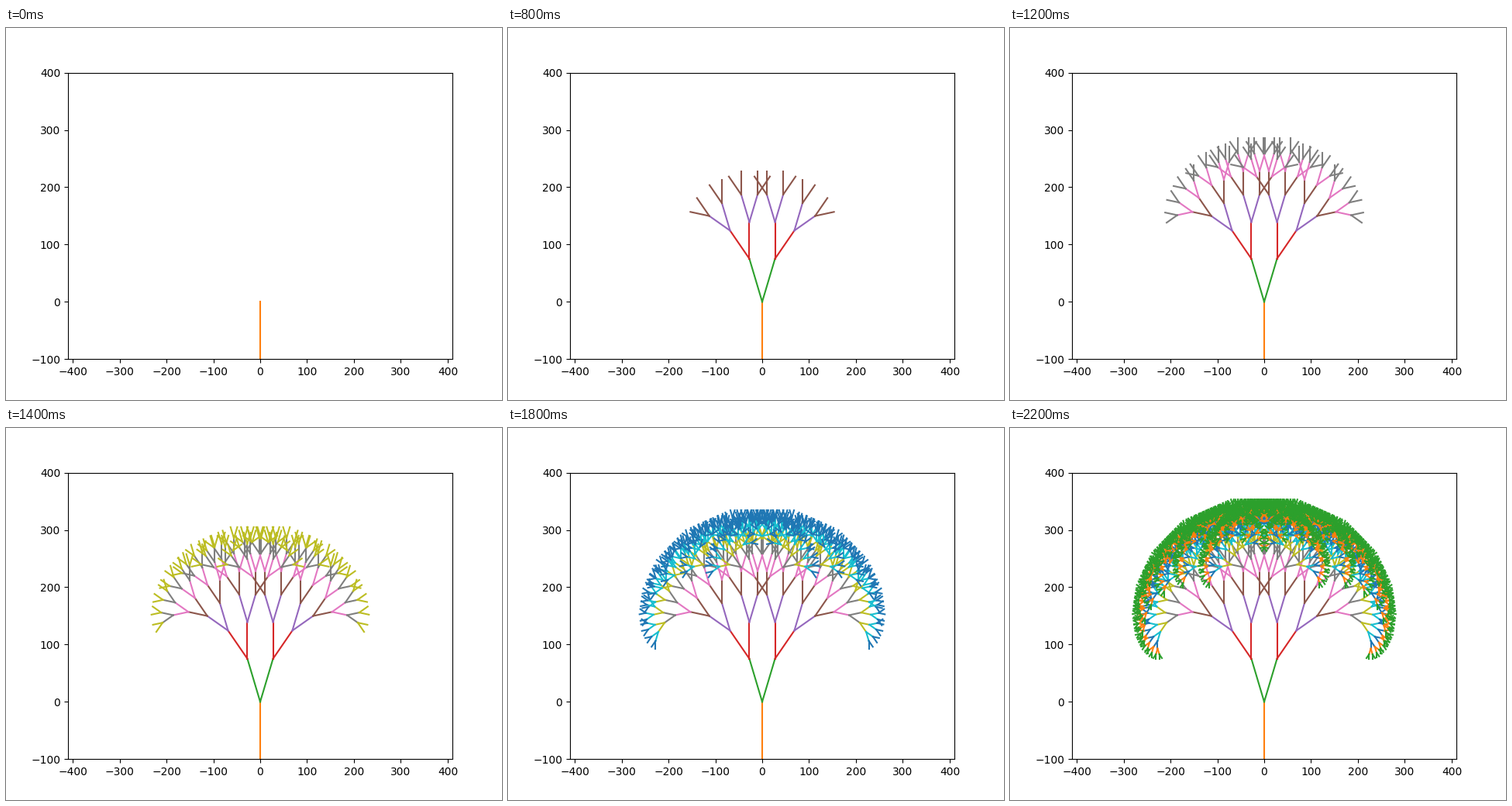
Animation of 640x480 px, one loop 2.4 s. Source, as a matplotlib script:

```python
import numpy as np
import matplotlib.pyplot as plt
from matplotlib.animation import FuncAnimation
from matplotlib.collections import LineCollection

LEVELS = 12
TRUNK = 100
RATIO = 0.8
TURN = np.radians(20)


def grow():
    """Yield the segments of each level as an array of (start, end) pairs."""
    base = np.array([[0.0, -TRUNK]])
    angle = np.array([np.pi / 2])
    length = TRUNK
    for _ in range(LEVELS):
        tip = base + length * np.column_stack([np.cos(angle), np.sin(angle)])
        yield np.stack([base, tip], axis=1)
        base = np.repeat(tip, 2, axis=0)
        angle = np.column_stack([angle + TURN, angle - TURN]).ravel()
        length *= RATIO


fig, ax = plt.subplots(figsize=(6.4, 4.8), dpi=100)
ax.set_xlim(-410, 410)
ax.set_ylim(-100, 400)

levels = []
for i, segments in enumerate(grow()):
    branches = LineCollection(segments, colors=f"C{(i + 1) % 10}",
                              linewidths=1.5, capstyle="projecting")
    ax.add_collection(branches, autolim=False)
    levels.append(branches)


def update(frame):
    for i, branches in enumerate(levels):
        branches.set_visible(i <= frame)
    return levels


anim = FuncAnimation(fig, update, frames=LEVELS, init_func=lambda: update(0),
                     interval=200, repeat=True, repeat_delay=0)
plt.show()
```
